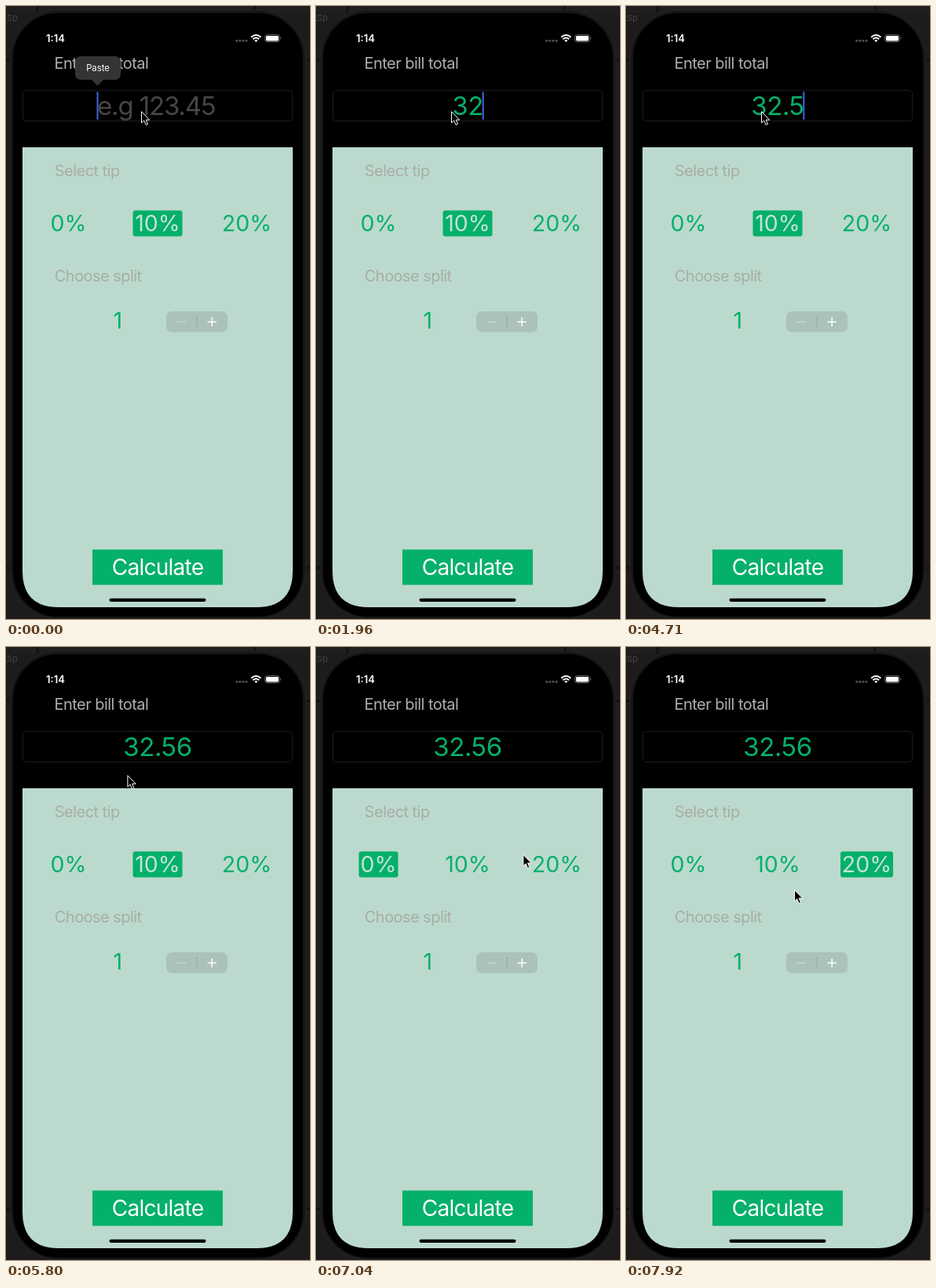
Write an HTML page that moves like this. It is 387 px wide and 781 px high and loops after 8 s.

```html
<!DOCTYPE html>
<html lang="en">
<head>
<meta charset="utf-8">
<title>Tip calculator</title>
<style>
  html, body { margin: 0; width: 100%; height: 100%; overflow: hidden; background: #1d1b1c; }
  svg { display: block; width: 387px; height: 781px; }
  text { font-family: Inter, "Open Sans", sans-serif; }
  .label { font-size: 20px; letter-spacing: -.027em; fill: #a9aca9; }
  .tip { font-size: 28.5px; text-anchor: middle; }
  .amount { font-size: 33px; letter-spacing: -.012em; text-anchor: middle; fill: #05b06a; }
</style>
</head>
<body>
<svg viewBox="0 0 387 781">
  <rect width="387" height="781" fill="#1d1b1c"/>
  <rect width="387" height="9" fill="#211e1f"/>
  <path d="M40 0V9M317 0V9M0 69H6M381 69H387M0 716H6M381 716H387" stroke="#111" stroke-width="3"/>
  <text x="-9" y="19" font-size="11" fill="#474445">ntSp</text>
  <rect x="5" y="5" width="377" height="776" rx="61" fill="#171717" stroke="#262626"/>
  <rect x="9" y="9" width="369" height="769" rx="57"/>

  <text x="51" y="46" font-size="13" font-weight="600" fill="#fff">1:14</text>
  <g fill="#515151">
    <circle cx="293.7" cy="44.3" r="1.5"/><circle cx="297.8" cy="44.3" r="1.5"/>
    <circle cx="301.9" cy="44.3" r="1.5"/><circle cx="306" cy="44.3" r="1.5"/>
  </g>
  <g fill="none" stroke="#fff" stroke-width="1.9">
    <path d="M312.2 39.8Q318.3 34.3 324.4 39.8M314.4 42.2Q318.3 38.8 322.2 42.2"/>
  </g>
  <path d="M316.2 43.8Q318.3 42.1 320.4 43.8L318.3 46Z" fill="#fff"/>
  <rect x="329.7" y="36.7" width="18.6" height="9" rx="2.6" fill="none" stroke="#777" stroke-width=".9"/>
  <rect x="331" y="38" width="16" height="6.4" rx="1.4" fill="#fff"/>
  <path d="M349.6 39.6Q351.3 41.2 349.6 42.8Z" fill="#888"/>

  <text class="label" x="61.5" y="80.3" style="fill:#afafaf">Enter bill total</text>
  <rect x="21.5" y="107.5" width="343" height="39" rx="4" fill="none" stroke="#1c1c1c"/>
  <text id="hint" x="116" y="139" font-size="33" letter-spacing="-.035em" fill="#464648">e.g 123.45</text>
  <text id="amount" class="amount" x="193" y="139"></text>
  <rect id="caret" y="109" width="2" height="36" rx="1" fill="#4265dc"/>
  <g id="popup">
    <path d="M95 64H139a7 7 0 0 1 7 7V87a7 7 0 0 1-7 7H124L116.5 101.5 109 94H95a7 7 0 0 1-7-7V71a7 7 0 0 1 7-7Z" fill="#343434"/>
    <text x="117" y="83" font-size="11.3" text-anchor="middle" fill="#fff">Paste</text>
  </g>

  <path d="M21 180H365V720Q365 766 319 766H67Q21 766 21 720Z" fill="#bbdacd"/>
  <text class="label" x="61.8" y="216.7">Select tip</text>
  <text class="label" x="61.8" y="351.3">Choose split</text>
  <g id="tips"></g>
  <text class="tip" x="142.3" y="411.3" fill="#05b06a">1</text>
  <rect x="204" y="389" width="78" height="26.5" rx="7" fill="#abc2b8"/>
  <path d="M217.5 402.5H229" stroke="#c9d6d0" stroke-width="1.4"/>
  <path d="M243 395V410" stroke="#95aaa0"/>
  <path d="M256.5 402.5H268M262.2 396.8V408.2" stroke="#fff" stroke-width="1.5"/>
  <rect x="110" y="692.5" width="166" height="45" fill="#05b06a"/>
  <text x="193" y="725.3" font-size="28" letter-spacing="-.027em" text-anchor="middle" fill="#fff">Calculate</text>
  <rect x="131.5" y="754.7" width="123" height="4.2" rx="2.1"/>

  <path id="cursor" d="M0 0V14.4L3.2 11.4 5.6 17 8 16 5.7 10.6H10.2Z" stroke="#fff" stroke-linejoin="round"/>
</svg>
<script>
const LOOP = 8000, GREEN = '#05b06a', PALE = '#c2e3d4';
const $ = id => document.getElementById(id);
const clamp = v => Math.min(1, Math.max(0, v));
const ramp = (t, start, length) => clamp((t - start) / length);

const smooth = u => u * u * (3 - 2 * u);
const easeIn = u => u * u;
const easeOut = u => u * (2 - u);

// start, text, caret x, first blink
const typing = [
  [0, '', 116.5, 9000],
  [60, '3', 203, 560],
  [1910, '32', 212.7, 2500],
  [4230, '32.', 217, 4820],
  [4710, '32.5', 226.3, 5300],
  [5070, '32.56', 237, 5650]
];
const EDIT_END = 6545;

// time, x, y, easing of the move that ends here
const path = [
  [5600, 172, 134],
  [6300, 84, 280, smooth],
  [6640, 84, 280, smooth],
  [7040, 263, 264, easeIn],
  [7240, 299, 276, easeOut],
  [7520, 299, 276, smooth],
  [7910, 214, 309, smooth]
];

const tips = [
  { label: '0%', x: 54.5, w: 50, press: 6380, on: 6525, off: 7435 },
  { label: '10%', x: 161.5, w: 63, press: -2000, on: -1000, off: 6525 },
  { label: '20%', x: 273, w: 67, press: 7280, on: 7435, off: 9000 }
];

function add(parent, tag, attrs) {
  const el = document.createElementNS('http://www.w3.org/2000/svg', tag);
  for (const k in attrs) el.setAttribute(k, attrs[k]);
  return parent.appendChild(el);
}

for (const tip of tips) {
  tip.box = add($('tips'), 'rect', { x: tip.x, y: 260.5, width: tip.w, height: 33, rx: 3, fill: GREEN });
  tip.title = add($('tips'), 'text', { x: tip.x + tip.w / 2, y: 287.2, class: 'tip' });
  tip.title.textContent = tip.label;
}

function blink(t, first) {
  if (t < first) return 1;
  const phase = (t - first) % 1020;
  return 1 - ramp(phase, 0, 120) + ramp(phase, 360, 120);
}

function pointerAt(t) {
  const next = path.findIndex(p => p[0] > t);
  if (next === 0) return path[0].slice(1, 3);
  if (next < 0) return path[path.length - 1].slice(1, 3);
  const [t0, x0, y0] = path[next - 1], [t1, x1, y1, ease] = path[next];
  const u = ease((t - t0) / (t1 - t0));
  return [x0 + (x1 - x0) * u, y0 + (y1 - y0) * u];
}

function drawTip(t, { press, on, off, box, title }) {
  const shown = ramp(t, on, 190);
  let fill = GREEN, opacity = 1;
  if (t >= off) {
    if (t < off + 150) fill = '#07a162';
  } else if (t >= on) {
    fill = PALE;
    opacity = .25 + .75 * shown;
  } else if (t >= press) {
    opacity = 1 - .8 * ramp(t, press, 40);
  }
  box.setAttribute('opacity', shown * (1 - ramp(t, off + 40, 130)));
  title.setAttribute('fill', fill);
  title.setAttribute('opacity', opacity);
}

function draw(t) {
  const [, text, caretX, firstBlink] = typing.filter(s => s[0] <= t).pop();
  $('amount').textContent = text;
  $('hint').setAttribute('opacity', text ? 0 : 1);
  $('caret').setAttribute('x', caretX - 1);
  $('caret').setAttribute('opacity', t < EDIT_END ? blink(t, firstBlink) : 0);
  $('popup').setAttribute('opacity', 1 - ramp(t, 30, 170));
  if (t < 60) $('popup').setAttribute('opacity', 1);
  tips.forEach(tip => drawTip(t, tip));
  $('cursor').setAttribute('transform', `translate(${pointerAt(t).map(v => v + .5)})`);
}

function tick() {
  draw(performance.now() % LOOP);
  requestAnimationFrame(tick);
}
tick();
</script>
</body>
</html>
```
